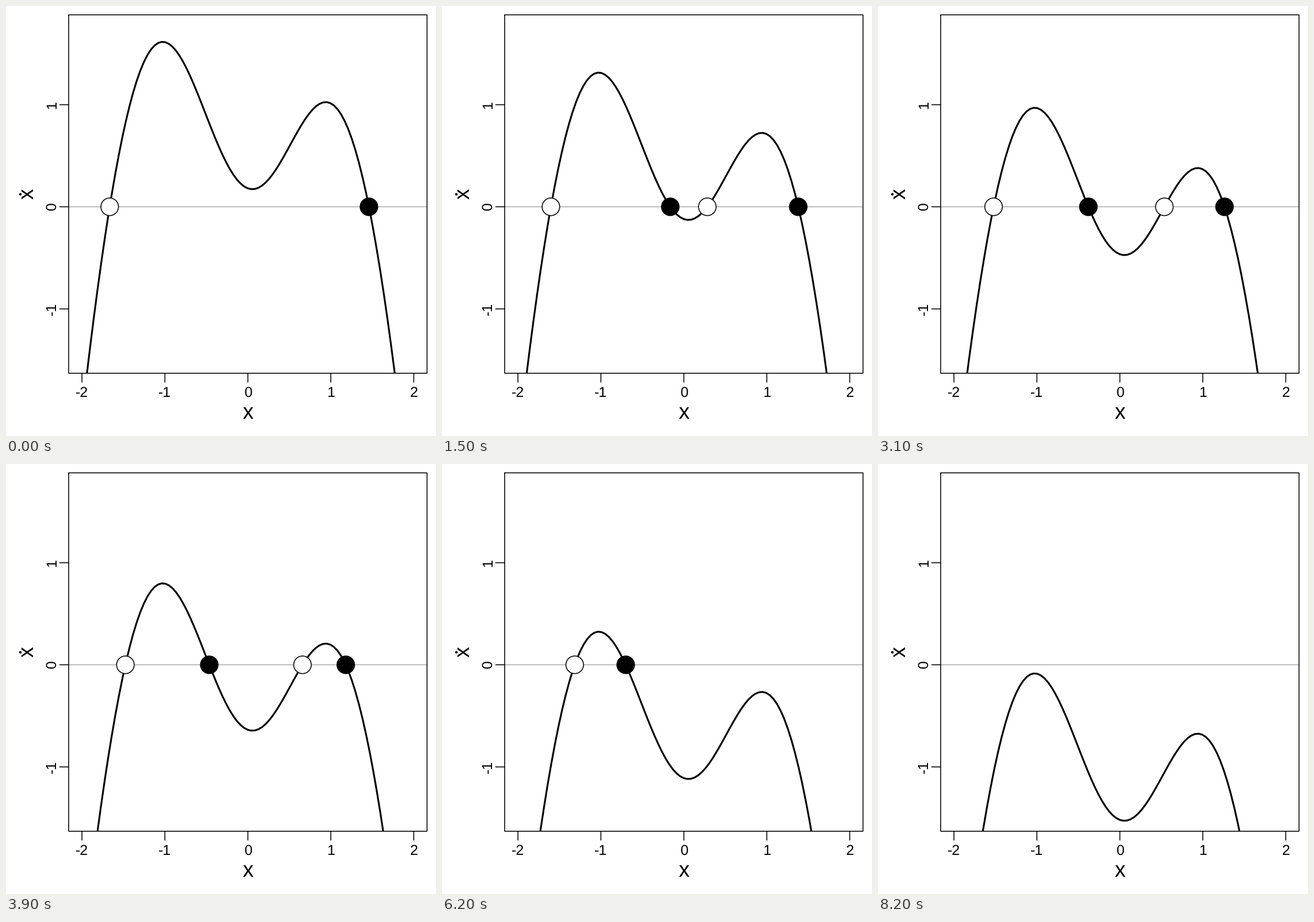
These frames come from a looping animation (748x748 px, 8300 ms). A matplotlib script:

```python
import numpy as np
import matplotlib.pyplot as plt
from matplotlib.animation import FuncAnimation
from matplotlib.patches import Circle, Rectangle, Wedge

plt.rcParams["font.family"] = "Liberation Sans"
plt.rcParams["text.hinting"] = "none"

SIZE, DPI = 748, 100
PT = 72 / DPI
LEFT, TOP, SIDE = 109.0, 15.4, 623.4
X_MIN, X_MAX = -2.16, 2.16
Y_MIN, Y_MAX = -1.63, 1.88
THIN, THICK = 1.56 * PT, 3.12 * PT
RADIUS = 15.3


def px(x):
    return LEFT + (x - X_MIN) / (X_MAX - X_MIN) * SIDE


def py(y):
    return TOP + (Y_MAX - y) / (Y_MAX - Y_MIN) * SIDE


def rate(x):
    """Flow on the line: a parabola with a normal-shaped dip and a tilt."""
    sd = 0.75
    bell = np.exp(-x**2 / (2 * sd**2)) / (sd * np.sqrt(2 * np.pi))
    return 5.5 - 2 * x**2 - 10 * bell - 0.3 * x


grid = np.linspace(X_MIN, X_MAX, 8001)
base = rate(grid)
slope = np.diff(base)
turns = np.where(slope[:-1] * slope[1:] < 0)[0] + 1

# Even steps, plus the exact shifts at which two fixed points merge
merges = {base[i]: i for i in turns}
shifts = np.sort(np.concatenate([np.linspace(0, 1.7, 80), list(merges)]))

fig = plt.figure(figsize=(SIZE / DPI, SIZE / DPI), dpi=DPI, facecolor="white")
ax = fig.add_axes([0, 0, 1, 1])
ax.set_xlim(0, SIZE)
ax.set_ylim(SIZE, 0)
ax.axis("off")


def stroke(xs, ys, color="black", width=THIN, z=2):
    return ax.plot(xs, ys, color=color, lw=width, zorder=z, snap=False,
                   solid_capstyle="round", solid_joinstyle="round")[0]


def label(x, y, text, size, turn=0):
    ax.text(x, y, text, fontsize=size * PT, rotation=turn,
            rotation_mode="anchor", ha="center", va="baseline")


right, bottom = LEFT + SIDE, TOP + SIDE
stroke([LEFT, right, right, LEFT, LEFT], [TOP, TOP, bottom, bottom, TOP], z=4)
stroke([LEFT, right], [py(0), py(0)], color="#acacac", z=1)

for v in range(-2, 3):
    stroke([px(v), px(v)], [bottom, bottom + 15.6])
    label(px(v), 679.8, str(v), 25)
for v in range(-1, 2):
    stroke([LEFT - 15.6, LEFT], [py(v), py(v)])
    label(86.8, py(v), str(v), 25, 90)

label(px(0), 718, "x", 37.5)
label(47.5, TOP + SIDE / 2, "x", 37.5, 90)
ax.add_patch(Circle((25, TOP + SIDE / 2 + 0.4), 2.2, color="black", lw=0))

frame_box = Rectangle((LEFT, TOP), SIDE, SIDE, transform=ax.transData)
curve_x = np.linspace(X_MIN, X_MAX, 101)
curve_y = rate(curve_x)
curve = stroke(px(curve_x), py(curve_y), width=THICK, z=3)
curve.set_clip_path(frame_box)

dots = []


def fixed_points(shift):
    """List of (x, kind), ordered from left to right."""
    f = base - shift
    found = []
    for i in np.where(f[:-1] * f[1:] < 0)[0]:
        x = grid[i] - f[i] * (grid[i + 1] - grid[i]) / (f[i + 1] - f[i])
        found.append((x, "stable" if f[i] > 0 else "unstable"))
    if shift in merges:
        i = merges[shift]
        found.append((grid[i], "left" if f[i + 1] > 0 else "right"))
    return sorted(found)


def add_dot(x, kind, z):
    center = (px(x), py(0))
    fill = "black" if kind == "stable" else "white"
    dots.append(ax.add_patch(Circle(center, RADIUS, fc=fill, ec="black",
                                    lw=THIN, zorder=z)))
    if kind in ("left", "right"):
        start = 90 if kind == "left" else -90
        dots.append(ax.add_patch(Wedge(center, RADIUS, start, start + 180,
                                       fc="black", lw=0, zorder=z + 0.5)))


def update(n):
    shift = shifts[n]
    curve.set_ydata(py(curve_y - shift))
    while dots:
        dots.pop().remove()
    for k, (x, kind) in enumerate(fixed_points(shift)):
        add_dot(x, kind, 5 + k)
    return [curve, *dots]


anim = FuncAnimation(fig, update, frames=len(shifts), interval=100,
                     repeat=True, repeat_delay=0, blit=False)
plt.show()
```
